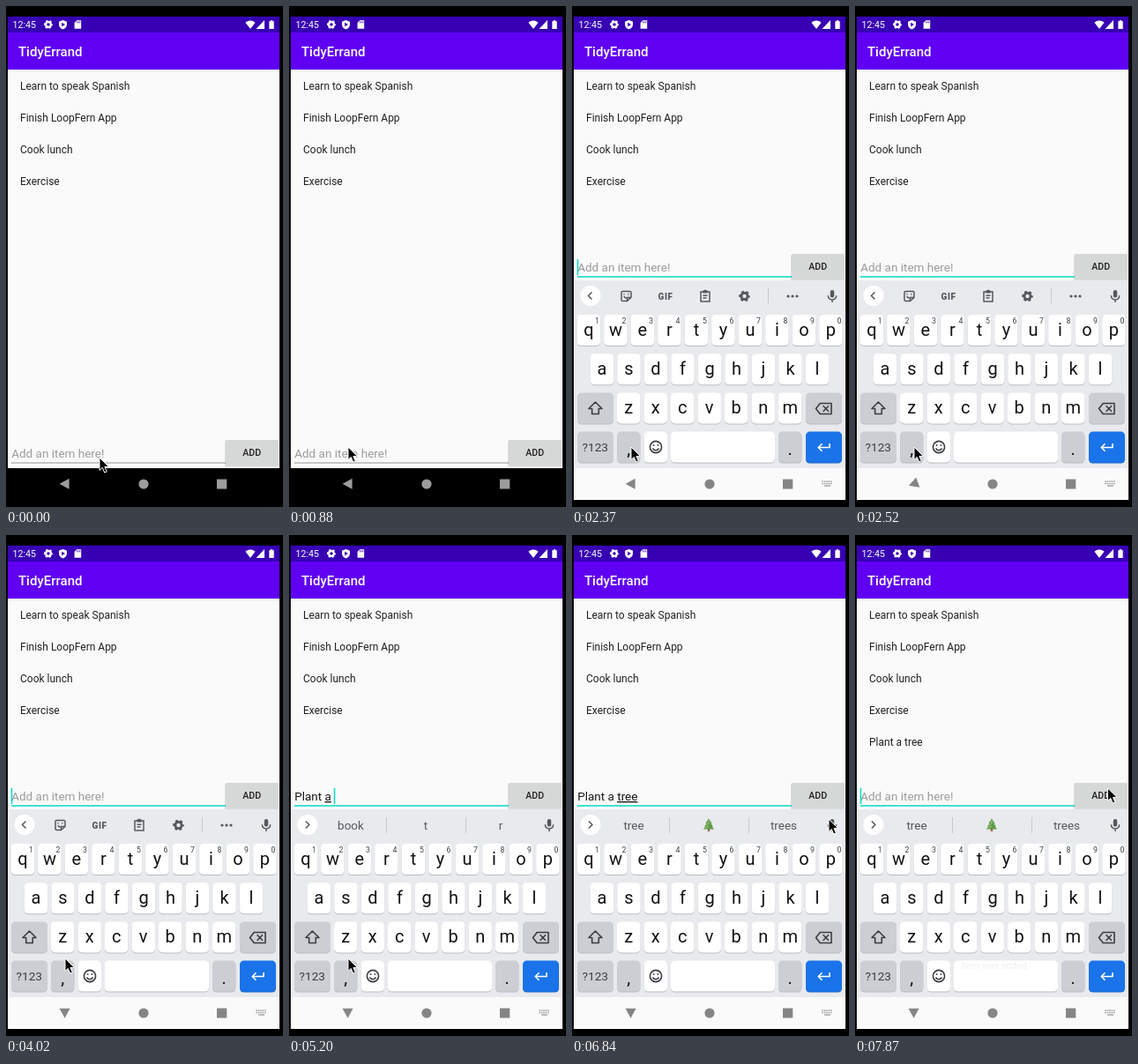
Recreate the animation shown at these times as an HTML page. Size 314 by 568 pixels, loop 8 s.

```html
<!DOCTYPE html>
<html lang="en">
<head>
<meta charset="utf-8">
<title>To-do list</title>
<style>
  html, body { margin: 0; width: 100%; height: 100%; overflow: hidden; background: #000; }
  svg { display: block; width: 314px; height: 568px; }
  text { font-family: Roboto, sans-serif; white-space: pre; }
  .mid { text-anchor: middle; }
  .item { font-size: 12px; fill: #212121; }
  .key { font-size: 20px; fill: #111214; }
  .digit { font-size: 8.8px; fill: #3c4043; }
  .word { font-size: 13.5px; fill: #54585d; }
  .mode { font-size: 13.7px; fill: #3a3d41; }
  .line { fill: none; stroke: #54585d; stroke-width: 1.5; }
  .bold { fill: none; stroke: #3a3d41; stroke-width: 1.6; stroke-linejoin: round; }
  .grey { fill: #54585d; }
  .composing { text-decoration: underline; }
</style>
</head>
<body>
<svg viewBox="0 0 314 568">
  <defs>
    <clipPath id="screen"><path d="M2 12H310V560H2z"/></clipPath>
    <g id="gear">
      <circle r="3.6" fill="none" stroke-width="2.8"/>
      <circle r="5.3" fill="none" stroke-width="2" stroke-dasharray="2.9 2.65" stroke-dashoffset="1.45"/>
    </g>
  </defs>

  <g clip-path="url(#screen)">
    <path fill="#fafafa" d="M2 12H310V524H2z"/>
    <path fill="#3700b3" d="M2 12H310V30H2z"/>
    <path fill="#6000f2" d="M2 30H310V72H2z"/>
    <path fill="#dedede" d="M2 72H310V73H2z"/>
    <path fill="#f0f0f0" d="M2 73H310V74.5H2z"/>

    <g fill="#fff">
      <text x="7.6" y="25" font-size="10.6">12:45</text>
      <use href="#gear" stroke="#fff" transform="translate(48 21) scale(.8)"/>
      <path d="M64.5 16L69 17.8V21Q69 25 64.5 26.4Q60 25 60 21V17.8z"/>
      <path fill="#3700b3" d="M63.2 18.7L67 21L63.2 23.3z"/>
      <path d="M80.4 16.2H85.2V25.8H77.6V19z"/>
      <path stroke="#3700b3" stroke-width=".8" d="M80.6 17.4V19.4M82.2 17.4V19.4M83.8 17.4V19.4"/>
      <path d="M277 26L271.4 18.8Q277 14.4 282.6 18.8z"/>
      <path d="M293 16V26H283.5z"/>
      <path d="M298.3 17.2H299.8V16.2H302.2V17.2H303.7V26H298.3z"/>
      <text x="14" y="56.8" font-size="15" font-weight="500">TidyErrand</text>
    </g>

    <g id="list"></g>

    <g id="bar">
      <text id="hint" x="6.2" y="512" font-size="13.5">Add an item here!</text>
      <text x="6.2" y="512" font-size="13.5" fill="#161616"><tspan id="done"></tspan><tspan id="composing" class="composing"></tspan></text>
      <path id="rule" d="M6 518H249"/>
      <path id="caret" stroke="#03dac5" stroke-width="1.5" d="M0 498V516"/>
      <rect x="248" y="492.5" width="61.5" height="30" rx="1.5" fill="#000" opacity=".12"/>
      <rect id="button" x="249" y="492" width="60" height="28.7" rx="1"/>
      <text class="mid" x="278.7" y="510.2" font-size="10.6" font-weight="500" fill="#212121">ADD</text>
    </g>

    <path id="navBack" d="M2 524H310V560H2z"/>

    <g id="keyboard">
      <path fill="#e8eaed" d="M2 311H310V524H2z"/>
      <circle cx="21" cy="328.5" r="11.5" fill="#fff"/>
      <path id="chevron" class="line" d="M22.5 324.5L18.5 328.5L22.5 332.5"/>
      <g id="tools">
        <path class="line" d="M57.5 323.5H65.5Q67 323.5 67 325V330.5L62.5 334.5H57.5Q56 334.5 56 333V325Q56 323.5 57.5 323.5zM62.5 334V330.5H66.5M58.8 329.2Q60 331.5 61.6 331"/>
        <path class="line" d="M59 326.2V327.6M63.8 326.2V327.6"/>
        <text class="mid grey" x="106" y="332.6" font-size="10" font-weight="900" letter-spacing=".5">GIF</text>
        <path class="line" d="M146 324H156V335H146zM148.5 328.3H153.5M148.5 331H152.5"/>
        <path class="grey" d="M148.3 322.5H149.7Q151 320.6 152.3 322.5H153.7V325.5H148.3z"/>
        <use href="#gear" stroke="#54585d" transform="translate(195.5 329)"/>
        <path stroke="#c6c9ce" d="M222.5 320V337"/>
        <g class="grey"><circle cx="245" cy="329" r="1.6"/><circle cx="250" cy="329" r="1.6"/><circle cx="255" cy="329" r="1.6"/></g>
      </g>
      <g id="words">
        <path stroke="#c6c9ce" d="M110.5 320V338M200.5 320V338"/>
        <text class="mid word" x="70" y="334"></text>
        <text class="mid word" x="155" y="334"></text>
        <text class="mid word" x="240" y="334"></text>
        <g id="tree">
          <path fill="#9a6b45" d="M153.8 332.5H156.2V336H153.8z"/>
          <path fill="#5f9a48" d="M155 321.5L158.6 327H157.4L160 330.4H158.6L161.2 333.4H148.8L151.4 330.4H150L152.6 327H151.4z"/>
          <path fill="#8fbb68" d="M155 322.5L156.4 326L153.4 329L155 331L150.2 333L153 329.8L151.7 329.8L154 326.2z"/>
        </g>
      </g>
      <rect x="292.8" y="322" width="4.4" height="8.6" rx="2.2" class="grey"/>
      <path class="line" d="M290.3 328.2Q290.6 332.7 295 332.9Q299.4 332.7 299.7 328.2M295 333V336"/>
      <g id="keys"></g>
      <path class="bold" d="M26.5 449L34 456.5H30.3V462.5H22.7V456.5H19z"/>
      <path class="bold" d="M276.5 456.5L281.2 450.5H294V462.5H281.2zM284.6 453.3L291 459.7M291 453.3L284.6 459.7"/>
      <circle class="bold" cx="95" cy="500" r="6.6"/>
      <path class="bold" d="M91.4 501.5Q95 506 98.6 501.5"/>
      <circle class="grey" cx="92.6" cy="498" r="1.1"/><circle class="grey" cx="97.4" cy="498" r="1.1"/>
      <path fill="none" stroke="#fff" stroke-width="1.6" d="M292 496V500.5H279.5M283.5 496.3L279.3 500.5L283.5 504.7"/>
      <text id="toast" class="mid" x="157.5" y="492" font-size="10.5" fill="#f0f0f0">Item was added</text>
    </g>

    <g id="nav">
      <path id="back" d="M-6 0L5 -6V6z"/>
      <circle cx="156" cy="542" r="5.6"/>
      <path d="M239 536.5H250.3V547.5H239z"/>
      <g id="switcher">
        <path fill="none" stroke="#8d9093" stroke-width="1.3" stroke-dasharray="1.4 1" d="M283.5 539H295.5M283.5 541.5H295.5"/>
        <path stroke="#8d9093" stroke-width="1.2" d="M286 544H293"/>
      </g>
    </g>
  </g>

  <path id="pointer" fill="#000" stroke="#fff" stroke-width="1" d="M0 0V14.4L3.3 11.4L5.7 17L8.3 15.9L5.9 10.4H10.5z"/>
</svg>

<script>
const LOOP = 8000;
const $ = id => document.getElementById(id);
const attr = (el, values) => { for (const k in values) el.setAttribute(k, values[k]); };
const show = (el, on) => { el.style.display = on ? '' : 'none'; };

function add(parent, tag, values, text = '') {
  const el = document.createElementNS('http://www.w3.org/2000/svg', tag);
  attr(el, values);
  el.textContent = text;
  return parent.appendChild(el);
}

// Static list and keyboard
const items = ['Learn to speak Spanish', 'Finish LoopFern App', 'Cook lunch', 'Exercise', 'Plant a tree']
  .map((name, i) => add($('list'), 'text', { class: 'item', x: 16, y: 94.5 + 36 * i }, name));

const keys = $('keys');
const rowTop = r => 350 + 44.2 * r;
function key(x, row, width, fill = '#fff', shadow = '#b9bcc1') {
  const shape = { x, width, height: 35, rx: 4.5 };
  add(keys, 'rect', { ...shape, y: rowTop(row) + 1, fill: shadow });
  add(keys, 'rect', { ...shape, y: rowTop(row), fill });
}
function label(text, x, y, values = {}) {
  add(keys, 'text', { class: 'mid key', x, y, ...values }, text);
}
[['qwertyuiop', 18.9], ['asdfghjkl', 34], ['zxcvbnm', 64.2]].forEach(([letters, left], r) => {
  [...letters].forEach((ch, i) => {
    const x = left + i * 30.5;
    key(x - 13.2, r, 26.4);
    label(ch, x, rowTop(r) + 23.8);
    if (!r) label((i + 1) % 10, x + 9.6, 360, { class: 'mid digit' });
  });
});
const dim = '#ccced4';
key(6, 2, 41, dim);
key(265, 2, 41, dim);
key(6, 3, 41, dim);
key(51, 3, 26.4, dim);
key(81.6, 3, 26.4);
key(112, 3, 118);
key(234, 3, 26.4, dim);
key(265, 3, 41, '#1a73e8', '#1b66c9');
label('?123', 26.3, 505, { class: 'mid mode' });
label(',', 64.2, 508.5);
label('.', 247.2, 508.5);

// Each row: start time, then values held until the next row
const pointerPath = [
  [0, 106, 512], [150, 106, 520], [300, 104, 526], [450, 92, 521], [590, 80, 512], [740, 71, 504], [880, 67, 500],
  [2670, 67, 494], [2820, 67, 486], [2970, 67, 480],
  [6540, 112, 450], [6690, 222, 372], [6840, 291, 322], [6990, 291, 309], [7140, 288, 295], [7280, 286.5, 287]
];
const typing = [
  [0, '', '', ''], [4170, '', 'P', ''], [4460, '', 'Pl', 'Please|Play|Plan'],
  [4610, '', 'Plan', 'Plan|Plans|Planning'], [4760, '', 'Plant', 'Plant|Plants|Planted'],
  [4900, 'Plant ', '', 'a|the|and'], [5050, 'Plant ', 'a', 'a|and|as'],
  [5200, 'Plant ', 'a', 'book|t|r', ' '], [5350, 'Plant a ', '', 'book|t|r'],
  [5650, 'Plant a ', 't', 'the|t|to'], [5940, 'Plant a ', 'tr', 'try|true|trip'],
  [6090, 'Plant a ', 'tre', 'tree|*|trees'], [6240, 'Plant a ', 'tree', 'tree|*|trees'],
  [7720, '', '', 'tree|*|trees']
];
const blink = [[0, 0], [2080, 1], [2520, 0], [2970, 1], [3420, 0], [4020, 1], [6690, 0], [7280, 1]];
const slide = [[0, 249], [2230, 90], [2370, 0]];
const turn = [[0, 0], [2520, -20], [2670, -65], [2820, -90]];
const buttonFill = [[0, '#d6d7d7'], [7430, '#c9caca'], [7870, '#d6d7d7']];
const at = (track, t) => track.findLast(row => row[0] <= t);

const pen = document.createElement('canvas').getContext('2d');
pen.font = '13.5px Roboto, sans-serif';
const slots = $('words').querySelectorAll('text');

function render(t) {
  const [, px, py] = at(pointerPath, t);
  attr($('pointer'), { transform: `translate(${px} ${py})` });

  const focused = t >= 1930, raised = t >= 2230, light = t >= 2370;
  attr($('bar'), { transform: `translate(0 ${raised ? -211 : 0})` });
  attr($('rule'), { stroke: focused ? '#03dac5' : '#b5b5b5', 'stroke-width': focused ? 1.6 : 1.3 });
  attr($('button'), { fill: at(buttonFill, t)[1] });
  attr($('keyboard'), { transform: `translate(0 ${at(slide, t)[1]})` });
  show($('keyboard'), raised);

  const [, done, composing, words, tail = ''] = at(typing, t);
  const typed = done + composing;
  $('done').textContent = done;
  $('composing').textContent = composing;
  show($('hint'), !typed);
  attr($('hint'), { fill: focused && t < 2080 ? '#757575' : '#9c9c9c' });
  attr($('caret'), { transform: `translate(${6.5 + pen.measureText(typed + tail).width} 0)` });
  show($('caret'), at(blink, t)[1]);

  show($('tools'), !words);
  show($('words'), words);
  show($('tree'), words.includes('*'));
  words.split('|').forEach((w, i) => { slots[i].textContent = w === '*' ? '' : w; });
  attr($('chevron'), { transform: words ? 'rotate(180 20.7 328.5)' : '' });

  attr($('navBack'), { fill: light ? '#fafafa' : '#000' });
  attr($('nav'), { fill: light ? '#858585' : '#9c9c9c' });
  attr($('back'), { transform: `translate(66.6 541.8) rotate(${at(turn, t)[1]})` });
  show($('switcher'), light);

  show(items[4], t >= 7720);
  show($('toast'), t >= 7870);
}

const start = performance.now();
function tick() {
  render((performance.now() - start) % LOOP);
  requestAnimationFrame(tick);
}
tick();
</script>
</body>
</html>
```
